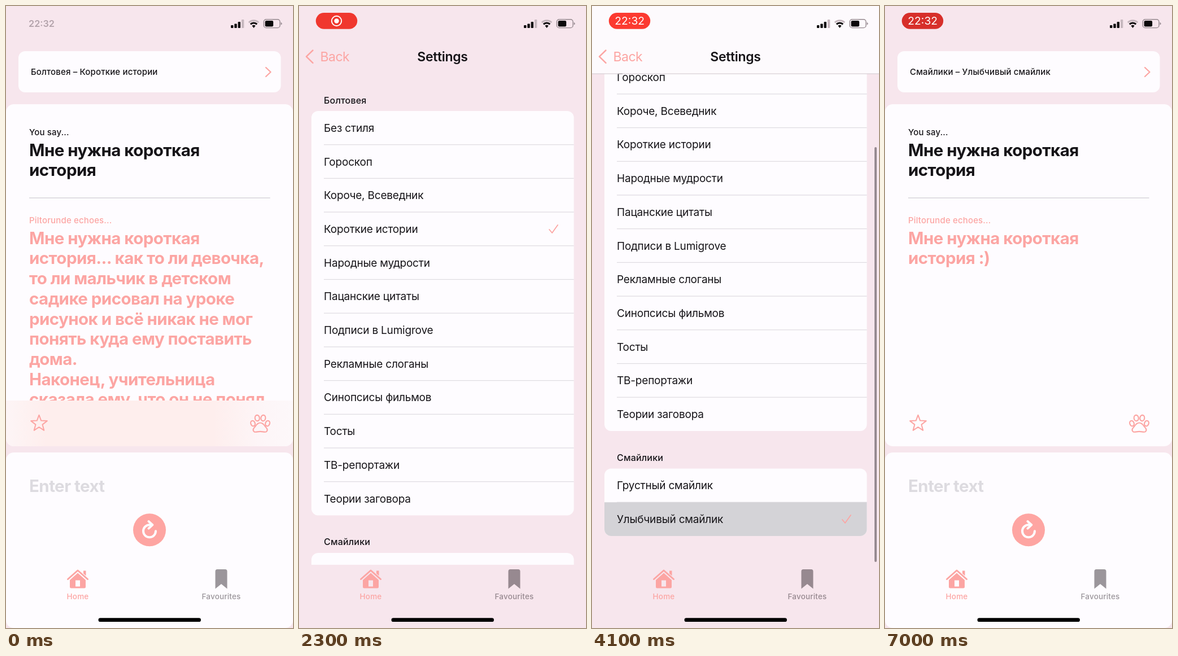
Write an HTML page that moves like this. It is 508 px wide and 1102 px high and loops after 7100 ms.

```html
<!DOCTYPE html>
<html lang="ru">
<head>
<meta charset="utf-8">
<title>Settings walkthrough</title>
<style>
html, body { margin: 0; width: 100%; height: 100%; overflow: hidden; background: #f7e6ed; }
svg { display: block; width: 100%; height: 100%; }
text { font-family: Inter, "Noto Sans", sans-serif; font-optical-sizing: none; fill: #161418; white-space: pre; }
.big { font-size: 29.5px; font-weight: 700; letter-spacing: -.56px; }
.small { font-size: 15px; font-weight: 500; letter-spacing: .15px; }
.head { font-size: 16px; font-weight: 500; letter-spacing: .2px; }
.row { font-size: 19px; letter-spacing: -.2px; }
.nav { font-size: 23px; letter-spacing: -.5px; }
.title { font-weight: 600; letter-spacing: -.3px; text-anchor: middle; }
.tab { font-size: 13.5px; font-weight: 500; letter-spacing: .17px; text-anchor: middle; }
.pink { fill: #fca5a3; }
.line { fill: none; stroke: #fca5a3; stroke-width: 2.2; stroke-linecap: round; stroke-linejoin: round; }
.card { fill: #fefcff; }
.page { fill: #f7e6ed; }
.grey { fill: #9c989b; mix-blend-mode: multiply; }
</style>
</head>
<body>
<svg id="stage" viewBox="0 0 508 1102" preserveAspectRatio="none"></svg>
<script>
const LOOP = 7100, FRAME = 100, W = 508;
const ROW = 59.7, LIST_TOP = 186, SMILE_TOP = 969;

const styles = ['Без стиля', 'Гороскоп', 'Короче, Всеведник', 'Короткие истории',
  'Народные мудрости', 'Пацанские цитаты', 'Подписи в Lumigrove', 'Рекламные слоганы',
  'Синопсисы фильмов', 'Тосты', 'ТВ-репортажи', 'Теории заговора'];
const smiles = ['Грустный смайлик', 'Улыбчивый смайлик'];
const request = ['Мне нужна короткая', 'история'];
const story = ['Мне нужна короткая', 'история... как то ли девочка,', 'то ли мальчик в детском',
  'садике рисовал на уроке', 'рисунок и всё никак не мог', 'понять куда ему поставить',
  'дома.', 'Наконец, учительница', 'сказала ему, что он не понял'];
const smiley = ['Мне нужна короткая', 'история :)'];

const text = (x, y, cls, str, extra = '') => `<text x="${x}" y="${y}" class="${cls}" ${extra}>${str}</text>`;
const rect = (x, y, w, h, r, extra) => `<rect x="${x}" y="${y}" width="${w}" height="${h}" rx="${r}" ${extra}/>`;
const path = (d, extra) => `<path d="${d}" ${extra}/>`;
const lines = (list, y, cls) => list.map((s, i) => text(41, y + i * 35.7, cls, s)).join('');

const list = (items, top) => rect(22, top, 464.5, items.length * ROW, 12, 'class="card"') +
  items.map((s, i) => (i ? rect(44, top + i * ROW - .6, 442.5, 1.2, 0, 'fill="#dedbe0"') : '') +
    text(44, top + i * ROW + 36.8, 'row', s)).join('');

const check = (id, y) => path(`M443 ${y + 1}l5 6 10-14`, `id="${id}" class="line" style="stroke-width:1.8"`);

function star(cx, cy, r) {
  const pts = Array.from({ length: 10 }, (_, i) => {
    const a = i * Math.PI / 5 - Math.PI / 2, d = i % 2 ? r * .42 : r;
    return `${(cx + d * Math.cos(a)).toFixed(1)},${(cy + d * Math.sin(a)).toFixed(1)}`;
  });
  return `<polygon points="${pts.join(' ')}" class="line" style="stroke-width:2"/>`;
}

const toe = (x, y, rx, ry, tilt) =>
  `<ellipse cx="${x}" cy="${y}" rx="${rx}" ry="${ry}" transform="rotate(${tilt} ${x} ${y})" class="line"/>`;
const paw = toe(437, 739.5, 3.7, 4.9, -22) + toe(444.7, 730, 4, 5.2, -8) +
  toe(455.3, 730, 4, 5.2, 8) + toe(463, 739.5, 3.7, 4.9, 22) +
  path('M450 738.5c-4.5 0-6.5 3-8.5 6-2 2.5-4 4-4 6.5 0 3 2.5 4 5 3.7 3-.4 4.5-.9 7.5-.9s4.5.5 7.5.9c2.5.3 5-.7 5-3.7 0-2.5-2-4-4-6.5-2-3-4-6-8.5-6z', 'class="line"');

const TOOLBAR = 'M0 699H508V766A14 14 0 0 1 494 780H14A14 14 0 0 1 0 766Z';

const home = `<g id="home">
  ${rect(0, 0, W, 1102, 0, 'class="page"')}
  ${rect(22, 80, 464.5, 73, 12, 'class="card"')}
  ${text(44, 122.3, 'small', '', 'id="choice"')}
  ${path('M460 109l8.5 8-8.5 8', 'class="line"')}
  ${rect(0, 174, W, 606, 14, 'class="card"')}
  ${text(41, 228.5, 'small', 'You say...')}
  ${lines(request, 265.7, 'big')}
  ${rect(41, 339, 426.5, 2, 0, 'fill="#e0dee3"')}
  ${text(41, 384.5, 'small pink', 'Piltorunde echoes...')}
  <g id="story"><g clip-path="url(#storyClip)">${lines(story, 421.7, 'big pink')}</g>
    ${path(TOOLBAR, 'fill="url(#haze)"')}${path(TOOLBAR, 'id="blush" fill="url(#warm)"')}</g>
  <g id="smiley">${lines(smiley, 421.7, 'big pink')}</g>
  ${star(58.5, 739.7, 15)}${paw}
  ${rect(0, 791, W, 311, 14, 'class="card"')}
  ${text(41, 860.7, 'big', 'Enter text', 'style="fill:#dddbe0"')}
  <g id="refresh"><circle cx="254" cy="928.3" r="29" fill="#fea5a2"/>
    <g fill="none" stroke="#fefcff" stroke-width="4" stroke-linecap="round" stroke-linejoin="round">
      ${path('M258 919.3H254A11 11 0 1 0 265 930.3', '')}${path('M252.5 913l6.8 6.3-6.8 6.3', '')}</g></g>
  ${rect(0, 0, W, 1102, 0, 'id="dim"')}
</g>`;

const settings = `<g id="settings">
  ${rect(0, 0, W, 1102, 0, 'class="page"')}
  <g clip-path="url(#listClip)"><g id="scroll">
    ${text(44, 172.7, 'head', 'Болтовея')}
    ${list(styles, LIST_TOP)}${check('checkStory', 395)}
    ${text(44, 955.2, 'head', 'Смайлики')}
    ${list(smiles, SMILE_TOP)}
    <g id="pressed">${path(`M22 ${SMILE_TOP + ROW}h464.5v${ROW - 12}a12 12 0 0 1-12 12h-440.5a12 12 0 0 1-12-12z`, 'fill="#d4d3d7"')}
      ${text(44, SMILE_TOP + ROW + 36.8, 'row', smiles[1])}</g>
    ${check('checkSmile', 1058.5)}
  </g></g>
  <g id="navBack">${rect(0, 0, W, 119.5, 0, 'fill="#fdfafd"')}${rect(0, 119.5, W, 1.2, 0, 'fill="#d8d1d6"')}</g>
  ${path('M24.5 78.5L13 89.7l11.5 11.2', 'class="line" style="stroke-width:2.5"')}
  ${text(37.5, 98, 'nav pink', 'Back')}
  ${text(254, 98, 'nav title', 'Settings')}
  ${rect(500, 250, 4, 735, 2, 'id="thumb" fill="#978a90"')}
</g>`;

const tabs = path('M109.5 1015.5L127 1000l17.5 15.5', 'class="line" style="stroke-width:3"') +
  path('M137 1000.5h4.5v9l-4.5-4zM127 1004.5L141 1017v12a2.5 2.5 0 0 1-2.5 2.5h-23a2.5 2.5 0 0 1-2.5-2.5v-12zM123 1017.5v11h8v-11z', 'class="pink" fill-rule="evenodd"') +
  text(127, 1050.5, 'tab pink', 'Home') +
  path('M374 998h14a3.5 3.5 0 0 1 3.5 3.5v31l-10.5-8.5-10.5 8.5v-31a3.5 3.5 0 0 1 3.5-3.5z', 'class="grey"') +
  text(381, 1050.5, 'tab grey', 'Favourites') +
  rect(163.5, 1084.3, 181.5, 6.8, 3.4, 'fill="#000"');

const arc = r => { const d = r * Math.SQRT1_2; return `M${438.5 - d} ${38 - d}A${r} ${r} 0 0 1 ${438.5 + d} ${38 - d}`; };
const status = [5, 7.5, 11, 15].map((h, i) =>
    rect(398 + i * 6.3, 39 - h, 4.4, h, 1, `fill="${i < 3 ? '#0b090a' : '#c8b9c0'}"`)).join('') +
  path(arc(12.3), 'fill="none" stroke="#c4b5bc" stroke-width="3"') +
  path(arc(8), 'fill="none" stroke="#0b090a" stroke-width="3.2"') +
  path(arc(4.3) + 'L438.5 39z', 'fill="#0b090a"') +
  rect(456.3, 23.8, 28.6, 14.8, 4.2, 'fill="none" stroke="#94888e" stroke-width="1.4"') +
  rect(458.6, 26, 14.5, 10.4, 2.2, 'fill="#0b090a"') +
  path('M486.5 28.8q2 .8 2 2.4t-2 2.4z', 'fill="#94888e"') +
  text(40, 37.3, '', '22:32', 'id="clock" font-size="16.3" font-weight="600" style="fill:#b3a3ab"') +
  `<g id="pill">${rect(29.8, 12, 73.4, 28.8, 14.4, 'id="pillBack"')}
    <g id="record"><circle cx="66.5" cy="26.5" r="8.7" fill="none" stroke="#fff" stroke-width="1.9"/>
      <circle cx="66.5" cy="26.5" r="4.2" fill="#fff"/></g>
    ${text(66.7, 33.4, '', '22:32', 'id="pillTime" font-size="19.3" text-anchor="middle" style="fill:#fff"')}</g>`;

const stage = document.getElementById('stage');
stage.innerHTML = `<defs>
  <clipPath id="storyClip">${rect(0, 360, W, 339, 0, '')}</clipPath>
  <clipPath id="listClip">${rect(0, 119.5, W, 870.5, 0, '')}</clipPath>
  <linearGradient id="haze"><stop offset="0" stop-color="#fdf5f6"/><stop offset=".14" stop-color="#feeeed"/>
    <stop offset=".72" stop-color="#feeeed"/><stop offset=".88" stop-color="#fdf5f7"/><stop offset="1" stop-color="#fdf8fa"/></linearGradient>
  <linearGradient id="warm" x2="0" y2="1"><stop offset="0" stop-color="#ffb0a8" stop-opacity=".1"/>
    <stop offset="1" stop-color="#ffb0a8" stop-opacity=".4"/></linearGradient>
</defs>` + home + settings + tabs + status;

const $ = Object.fromEntries([...stage.querySelectorAll('[id]')].map(el => [el.id, el]));
const ramp = (t, a, b) => Math.min(1, Math.max(0, (t - a) / (b - a)));
const show = (el, alpha) => el.setAttribute('opacity', +alpha);
const shift = (el, x, y) => el.setAttribute('transform', `translate(${x} ${y})`);

function spring(t, start) {
  const u = Math.max(0, t - start) * .0135;
  const p = 1 - (1 + u) * Math.exp(-u);
  return p > .998 ? 1 : p;
}

function track(t, keys) {
  const i = keys.findIndex(k => k[0] > t);
  if (i < 0) return keys[keys.length - 1][1];
  if (!i) return keys[0][1];
  const [a, b] = [keys[i - 1], keys[i]];
  return a[1] + (b[1] - a[1]) * ramp(t, a[0], b[0]);
}

const SCROLL = [[2400, 0], [2500, 12], [2600, 52], [2700, 108], [2800, 145],
  [2900, 155], [3000, 152.5], [3100, 150.3], [3200, 149.5]];

function render(t) {
  const push = spring(t, 1250) - spring(t, 4600);
  shift($.home, -.3 * W * push, 0);
  show($.dim, .085 * push);
  show($.blush, push);
  shift($.settings, W * (1 - push), 0);

  const y = track(t, SCROLL), over = Math.max(0, y - 149.5);
  shift($.scroll, 0, -y);
  show($.navBack, ramp(y, 0, 20));
  $.thumb.setAttribute('y', 250 - (149.5 - y) * .85 + over * .15);
  $.thumb.setAttribute('height', 735 - over);
  show($.thumb, ramp(t, 2400, 2500) * (1 - ramp(t, 4200, 4500)));

  const picked = t >= 4000;
  show($.checkStory, !picked);
  show($.checkSmile, picked);
  show($.pressed, t >= 3900 ? 1 - ramp(t, 4200, 4500) : 0);
  $.choice.textContent = picked ? 'Смайлики – Улыбчивый смайлик' : 'Болтовея – Короткие истории';

  const answered = t >= 6100;
  show($.story, !answered);
  show($.smiley, answered);
  show($.refresh, track(t, [[5800, 1], [5900, .5], [6000, .5], [6200, 1]]));

  show($.clock, 1 - ramp(t, 0, 200));
  show($.pill, ramp(t, 0, 300));
  const glow = (1 - Math.cos((t - 2900) / 2050 * 2 * Math.PI)) / 2;
  $.pillBack.setAttribute('fill', `rgb(${215 + 40 * glow},${47 + 12 * glow},${42 + 6 * glow})`);
  const clock = ramp(t, 3400, 3700);
  show($.record, 1 - clock);
  show($.pillTime, clock);
}

const start = performance.now();
function tick() {
  const t = (performance.now() - start) % LOOP;
  render(Math.floor(t / FRAME) * FRAME);
  requestAnimationFrame(tick);
}
tick();
</script>
</body>
</html>
```
